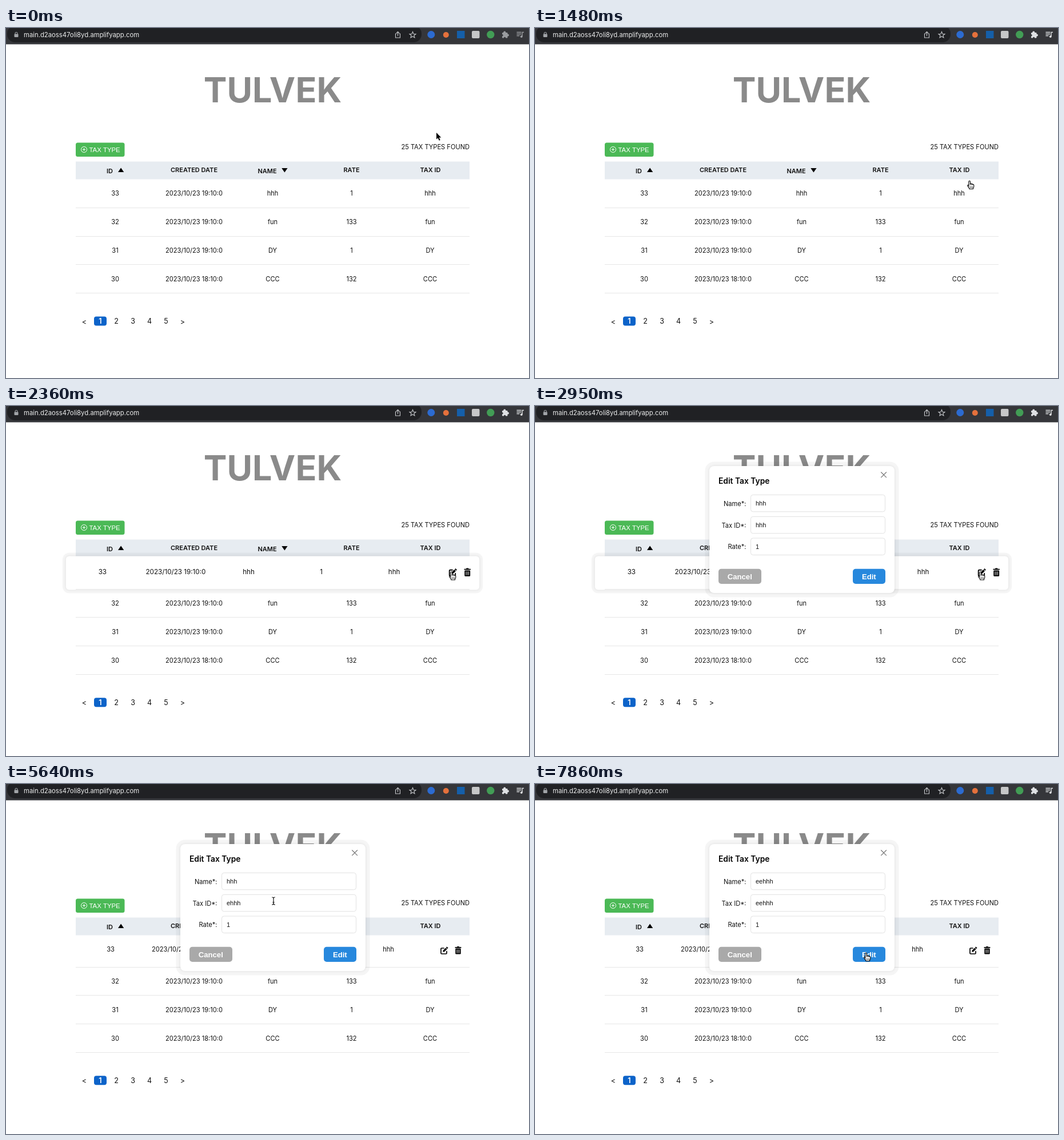
An HTML page with a canvas for the animation above (8 s loop, 915 px wide and 612 px high).

```html
<!DOCTYPE html>
<html lang="en">
<head>
<meta charset="utf-8">
<title>Tax types</title>
<style>
html, body { margin: 0; width: 100%; height: 100%; overflow: hidden; background: #fff; }
canvas { display: block; }
</style>
</head>
<body>
<canvas id="stage" width="915" height="612"></canvas>
<script>
const ctx = document.getElementById('stage').getContext('2d');
const LOOP = 8000, TICK = 148.2;
const UI = 'Inter, sans-serif', FORM = '"Liberation Sans", Arial, sans-serif';
const COLUMNS = [191, 329, 466.5, 604.5, 742];
const ACTIVE_COLUMNS = [183, 305, 426.5, 547.5, 669];
const ROWS = [
  ['33', '2023/10/23 19:10:0', 'hhh', '1', 'hhh'],
  ['32', '2023/10/23 19:10:0', 'fun', '133', 'fun'],
  ['31', '2023/10/23 19:10:0', 'DY', '1', 'DY'],
  ['30', '2023/10/23 18:10:0', 'CCC', '132', 'CCC']
];
// Pointer path: tick, x, y, shape
const POINTER = [
  [0, 753, 183, 'arrow'], [1, 753, 183, 'arrow'], [5, 757, 208, 'arrow'], [9, 763, 253, 'arrow'],
  [10, 760.5, 268, 'hand'], [12, 764, 273, 'hand'], [15, 779.5, 290.5, 'hand'],
  [21, 779.5, 290.5, 'hand'], [22, 765, 286, 'hand'], [23, 624, 240, 'arrow'],
  [24, 500, 211, 'beam'], [25, 468, 199, 'beam'], [28, 468, 199, 'beam'],
  [29, 468, 204.5, 'beam'], [40, 468, 204.5, 'beam'], [41, 477, 235, 'beam'],
  [42, 448, 214, 'beam'], [43, 402, 181, 'beam'], [44, 380, 171, 'beam'],
  [45, 388, 172, 'beam'], [49, 388, 172, 'beam'], [50, 430, 212, 'beam'],
  [51, 520, 274, 'arrow'], [52, 588, 306, 'hand'], [53, 579.5, 296, 'hand']
];

const clamp = v => Math.max(0, Math.min(1, v));

function box(x, y, w, h, r, fill, stroke) {
  ctx.beginPath();
  ctx.roundRect(x, y, w, h, r);
  if (fill) { ctx.fillStyle = fill; ctx.fill(); }
  if (stroke) { ctx.strokeStyle = stroke; ctx.lineWidth = 1; ctx.stroke(); }
}

function disc(x, y, r, fill) {
  ctx.beginPath();
  ctx.arc(x, y, r, 0, 7);
  ctx.fillStyle = fill;
  ctx.fill();
}

function shape(points, fill) {
  ctx.beginPath();
  points.forEach(p => ctx.lineTo(...p));
  ctx.closePath();
  ctx.fillStyle = fill;
  ctx.fill();
}

function strokePath(d, color, width = 1) {
  ctx.strokeStyle = color;
  ctx.lineWidth = width;
  ctx.stroke(new Path2D(d));
}

function fillPath(d, color) {
  ctx.fillStyle = color;
  ctx.fill(new Path2D(d));
}

function at(x, y, draw) {
  ctx.save();
  ctx.translate(x, y);
  draw();
  ctx.restore();
}

// y is the middle of the capital letters
function text(s, x, y, { size = 11.1, weight = 400, color = '#111', align = 'center', family = UI } = {}) {
  ctx.font = `${weight} ${size}px ${family}`;
  ctx.textAlign = align;
  ctx.fillStyle = color;
  ctx.fillText(s, x, y + size * 0.36);
}

function halo(x, y, w, h, r, spread, alpha) {
  ctx.save();
  ctx.globalAlpha = alpha;
  box(x - spread, y - spread, w + 2 * spread, h + 2 * spread, r + spread, 'rgba(0,0,0,.038)');
  ctx.shadowColor = 'rgba(0,0,0,.1)';
  ctx.shadowBlur = 4;
  box(x, y, w, h, r, '#fff');
  ctx.restore();
}

function browserBar(tick) {
  ctx.fillStyle = '#35363a';
  ctx.fillRect(0, 0, 915, 28.5);
  box(2, -4, 725, 29, 14, '#202124');
  box(14.5, 10.5, 7, 5.5, 1, '#a2a5a9');
  strokePath('M16 11V9.5a2 2 0 0 1 4 0V11', '#a2a5a9', 1.1);
  text('main.d2aoss47oli8yd.amplifyapp.com', 31, 11.5, { size: 11.3, color: '#eceded', align: 'left' });

  const icon = '#c5c7ca';
  strokePath('M683.5 10H681.5V17H689.5V10H687.5M685.5 14V6.5M683 9l2.5-2.5L688 9', icon, 1.1);
  ctx.beginPath();
  for (let i = 0; i < 10; i++) {
    const a = i * Math.PI / 5 - Math.PI / 2, r = i % 2 ? 2.5 : 5.8;
    ctx.lineTo(711.5 + r * Math.cos(a), 12.2 + r * Math.sin(a));
  }
  ctx.closePath();
  ctx.lineWidth = 1.1;
  ctx.stroke();

  disc(743.8, 11.5, 6.5, '#2c6bd1');
  disc(769.8, 12, 5, '#e5713c');
  box(789, 5, 13.5, 13, 0, '#155fa9');
  box(815, 5, 13.5, 13, 2, '#c6c7c8');
  disc(847.8, 11.5, 6.7, '#429d55');

  const awake = tick >= 6 ? '#dfe1e4' : '#9a9ca0';
  box(868, 8, 9.5, 9.5, 1.2, awake);
  disc(872.3, 7.5, 2, awake);
  disc(878, 12.5, 2, awake);
  disc(868, 12.8, 1.7, '#35363a');
  disc(872.6, 17.5, 1.7, '#35363a');
  strokePath('M893.5 7.5h8M893.5 10.5h8M893.5 13.5h5M903.2 15V7.5h2.8', awake, 1.3);
  disc(901.8, 15, 1.9, awake);
}

function rowIcons() {
  at(760, 284, () => {
    ctx.lineCap = ctx.lineJoin = 'round';
    strokePath('M6 3H2.2Q1 3 1 4.2V11.8Q1 13 2.2 13H9.8Q11 13 11 11.8V8.5', '#000', 1.7);
    shape([[4.2, 9.8], [4.7, 6.9], [9.2, 2.4], [11.6, 4.8], [7.1, 9.3]], '#000');
    shape([[9.8, 1.8], [11.3, 0.4], [13.5, 2.6], [12.1, 4.2]], '#000');
  });
  at(785.5, 284, () => {
    box(0, 1, 11, 1.8, 0.6, '#000');
    box(3.5, 0, 4, 2, 0.6, '#000');
    box(0.8, 3.6, 9.4, 9.8, 1.2, '#000');
    strokePath('M3.3 5.5v6M5.5 5.5v6M7.7 5.5v6', '#fff', 0.8);
  });
}

function activeRow(lift) {
  const scale = 1 + 0.05 * lift;
  if (lift > 0) {
    const w = 689 * scale, h = 56 * scale;
    halo(466.5 - w / 2, 292 - h / 2, w, h, 6, 6, lift);
  }
  at(466.5, 292, () => {
    ctx.scale(scale, scale);
    ctx.translate(-466.5, -292);
    ROWS[0].forEach((s, i) => text(s, ACTIVE_COLUMNS[i], 289.5));
    rowIcons();
  });
}

function page(tick) {
  const expanded = tick >= 11, shift = expanded ? 5.7 : 0;
  const lift = clamp((tick - 11) / 2) - clamp((tick - 22) / 3);

  text('TULVEK', 466.5, 108.5, { size: 61, weight: 700, color: '#8a8a8a' });
  box(122, 200.5, 85.5, 24.5, 3.5, '#4bb956');
  strokePath('M131.5 212.5a5 5 0 1 0 10 0a5 5 0 1 0 -10 0M134 212.5h5M136.5 210v5', '#fff', 1);
  text('TAX TYPE', 145.5, 212.7, { size: 11.4, color: '#fff', align: 'left', family: FORM });
  text('25 TAX TYPES FOUND', 811, 207.7, { align: 'right' });

  ctx.fillStyle = '#e7ecf1';
  ctx.fillRect(122, 233.5, 689, 31);
  const head = { size: 11, weight: 600 };
  text('ID', 181.5, 250.2, head);
  text('CREATED DATE', 329, 248.2, head);
  text('NAME', 457, 250.2, head);
  text('RATE', 604.5, 248.2, head);
  text('TAX ID', 742.5, 248.2, head);
  shape([[196, 252], [206.3, 252], [201.1, 244.5]], '#000');
  shape([[482.3, 245], [492.6, 245], [487.4, 252.5]], '#000');

  ROWS.forEach((row, r) => {
    const y = 289.5 + r * 49.9 + shift;
    if (r || !expanded) row.forEach((s, i) => text(s, COLUMNS[i], y));
  });
  if (expanded) activeRow(lift);
  ctx.fillStyle = '#e6e6e6';
  for (let r = 0; r < 4; r++) ctx.fillRect(122, Math.round(313.8 + r * 49.8 + shift), 689, 1);

  const y = 512.5 + shift;
  box(154, y - 8, 22, 16, 4, '#0c63c9');
  text('1', 165, y, { size: 12.5, weight: 600, color: '#fff' });
  ['<', '', '2', '3', '4', '5', '>'].forEach((s, i) =>
    text(s, [137, 165][i] ?? 193 + (i - 2) * 29, y + (s === '<' || s === '>' ? 0.7 : 0), { size: 12.5 }));
}

function field(label, value, y, { caret = -1, misspelt = false } = {}) {
  text(label, 369.5, y + 0.7, { align: 'right' });
  box(377.5, y - 14.7, 235, 29.5, 4, '#fff', '#e2e2e2');
  text(value, 386, y + 0.3, { size: 11, align: 'left', family: FORM });
  if (misspelt) {
    ctx.setLineDash([1.4, 1.2]);
    strokePath(`M386 ${y + 5.2}h18.5`, '#e2493f', 1.3);
    ctx.setLineDash([]);
  }
  if (caret >= 0) {
    ctx.fillStyle = '#222';
    ctx.fillRect(Math.round(386 + ctx.measureText(value.slice(0, caret)).width), y - 6.5, 1, 12);
  }
}

function dialog(tick) {
  const between = (a, b) => tick >= a && tick < b;
  const typed = (first, second) => 'e'.repeat((tick >= first) + (tick >= second)) + 'hhh';
  const idCaret = between(27, 29) ? 3 : between(33, 35) ? 0 : between(35, 38) ? 1 : between(40, 43) ? 2 : -1;
  const nameCaret = between(46, 48) ? 0 : between(48, 49) ? 1 : between(49, 52) ? 2 : -1;

  halo(305, 105, 324, 222, 8, 7.5, 1);
  text('Edit Tax Type', 321, 131, { size: 13.8, weight: 600, color: '#000', align: 'left' });
  strokePath('M605.3 115.5l9.6 9.6M614.9 115.5l-9.6 9.6', '#777', 1.2);
  field('Name*:', typed(48, 49), 170, { caret: nameCaret, misspelt: between(46, 48) });
  field('Tax ID*:', typed(35, 40), 208, { caret: idCaret, misspelt: between(27, 35) });
  field('Rate*:', '1', 245.7);
  const label = { size: 13.1, weight: 700, color: '#fff', family: FORM };
  box(321, 284.8, 75, 26.2, 5, '#a9a9a9');
  text('Cancel', 358.3, 297.8, label);
  box(556, 284.8, 57, 26.2, 5, '#2788dd');
  text('Edit', 584.3, 297.8, label);
}

const cursors = {
  arrow() {
    const d = 'M0 0V11.6L2.7 9.2L4.7 13.8L6.7 12.9L4.7 8.5H8.3Z';
    strokePath(d, '#fff', 1.8);
    fillPath(d, '#000');
  },
  hand() {
    const d = 'M-1.7 8V.8Q-1.6-.7-.4-.7Q.9-.7.9.8V4.3Q2.3 3.4 3.2 4.7Q4.6 4.1 5.3 5.4Q7.3 5 7.3 7V9.2Q7.2 11 6 12.2V13.5H-.7V12.3Q-2.2 10.6-3.6 8.2Q-4.2 6.8-3 6.4Q-2.3 6.5-1.7 8Z';
    fillPath(d, '#fff');
    strokePath(d, '#000', 1.1);
    strokePath('M.9 4.5V7M3.1 5V7M5.2 5.6V7.2M1 9v2.7M3 9v2.7M5 9v2.7', '#000', 0.8);
  },
  beam() {
    const d = 'M-2.8-6.5Q0-6.5 0-4.8Q0-6.5 2.8-6.5M0-4.8V4.8M-2.8 6.5Q0 6.5 0 4.8Q0 6.5 2.8 6.5M-1.5 2.3H1.5';
    strokePath(d, '#fff', 2.4);
    strokePath(d, '#111', 1.2);
  }
};

function pointer(tick) {
  let i = 0;
  while (i < POINTER.length - 1 && POINTER[i + 1][0] <= tick) i++;
  const [t0, x0, y0, kind] = POINTER[i];
  const [t1, x1, y1] = POINTER[i + 1] || [t0 + 1, x0, y0];
  const k = clamp((tick - t0) / (t1 - t0));
  at(x0 + (x1 - x0) * k, y0 + (y1 - y0) * k, cursors[kind]);
}

function render(now) {
  const tick = Math.floor((now % LOOP + 15) / TICK) % 54;
  ctx.fillStyle = '#fff';
  ctx.fillRect(0, 0, 915, 612);
  browserBar(tick);
  page(tick);
  if (tick >= 20) dialog(tick);
  pointer(tick);
}

const start = performance.now();
function loop() {
  render(performance.now() - start);
  requestAnimationFrame(loop);
}
loop();
</script>
</body>
</html>
```
